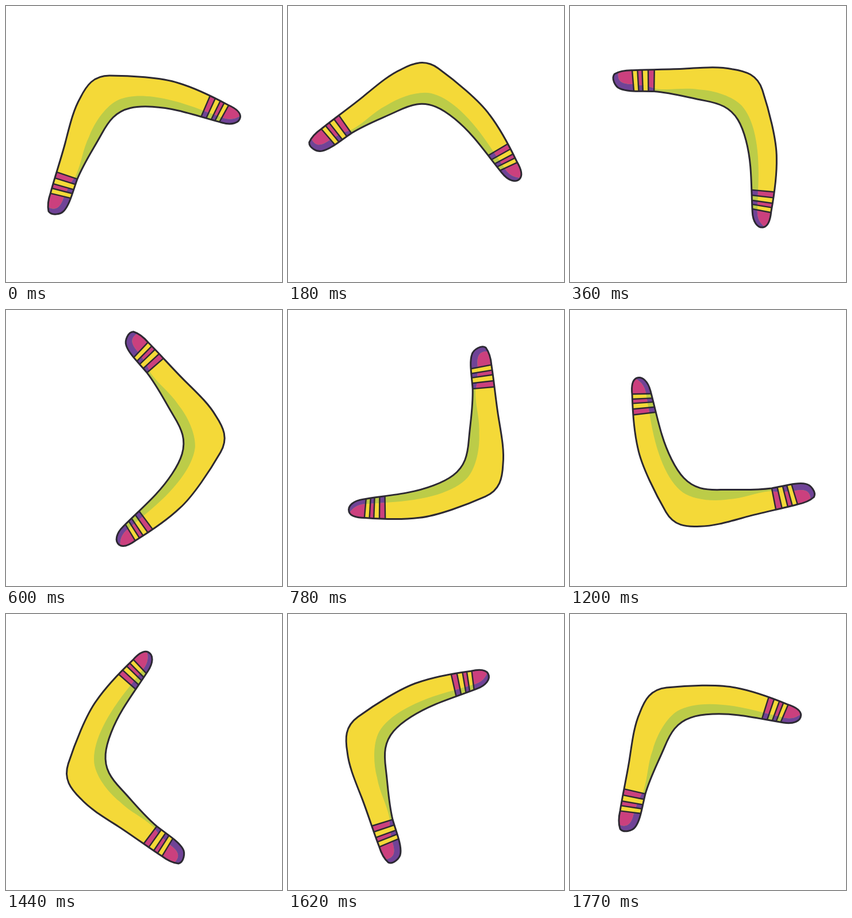
Animation, 480 px wide and 480 px high, one loop 1800 ms. Source, as an HTML page with a canvas:

```html
<!DOCTYPE html>
<html>
<head>
<meta charset="utf-8">
<title>Boomerang</title>
<style>
  html, body { margin: 0; width: 100%; height: 100%; overflow: hidden; background: #fff; }
  canvas { display: block; }
</style>
</head>
<body>
<canvas id="stage" width="480" height="480"></canvas>
<script>
const ctx = document.getElementById('stage').getContext('2d');
const LOOP = 1800, STEP = 30;
const YELLOW = '#f4d938', GREEN = '#bccc48', PINK = '#cb407e', PURPLE = '#704397', INK = '#2c2932';

const body = new Path2D(`M77.5 325 C84 300 95 268 103 238 C111 207 117 181 129 160
  C140 138 152 121 180 121 C215 121 270 124 300 134 C330 143 360 158 386 172
  C402 179 408 186 407.5 193 C406 204 392 207.5 376 203 C350 196 322 187 300 182
  C270 175 237 172.5 216 177.5 C191 183.5 179 199 166 223 C150 252 136 272 124 301
  C116 323 111 345 101 356 C95 363 79 365 74 357 C72 348 74 335 77.5 325Z`);

// Everything on the inner side of the curve
const shade = new Path2D(`M66 345 L76 351 C86 355 94 352 100 334 L111 310 L121 296
  C132 272 133 250 145 226 C155 200 175 173 195 163.5 C225 150.5 275 155.5 343 182
  L376 194 C390 199 400 197 412 188 L430 230 L240 260 L100 400 L60 370Z`);

// First and last band line of each end, as x1, y1, x2, y2
const ends = [
  { from: [89, 289, 124, 301], to: [78, 326, 112, 334], gap: YELLOW },
  { from: [355, 156, 340, 191], to: [387, 173, 371, 202], gap: GREEN }
];
const cuts = [0, .28, .55, .76, 1, 2.6];

// Point on band line k; s runs across the blade
function at({ from, to }, k, s) {
  const [x1, y1, x2, y2] = from.map((v, i) => v + (to[i] - v) * k);
  return [x1 + (x2 - x1) * s, y1 + (y2 - y1) * s];
}

function poly(...points) {
  ctx.beginPath();
  points.forEach(p => ctx.lineTo(...p));
}

function paint(main, band, shaded) {
  ctx.fillStyle = main;
  ctx.fill(body);
  for (const end of ends) {
    for (let i = 0; i < 5; i++) {
      const a = cuts[i], b = cuts[i + 1];
      poly(at(end, a, -.3), at(end, a, 1.3), at(end, b, 1.3), at(end, b, -.3));
      ctx.fillStyle = i % 2 ? (shaded ? end.gap : main) : band;
      ctx.fill();
    }
  }
}

function draw(angle) {
  ctx.clearRect(0, 0, 480, 480);
  ctx.save();
  ctx.translate(240, 240);
  ctx.rotate(angle);
  ctx.translate(-240, -240);

  ctx.save();
  ctx.clip(body);
  paint(YELLOW, PINK, false);
  ctx.save();
  ctx.clip(shade);
  paint(GREEN, PURPLE, true);
  ctx.restore();
  ctx.strokeStyle = INK;
  ctx.lineWidth = 2.4;
  for (const end of ends) {
    for (const k of cuts.slice(0, 5)) {
      poly(at(end, k, -.1), at(end, k, 1.1));
      ctx.stroke();
    }
  }
  ctx.restore();

  ctx.strokeStyle = INK;
  ctx.lineWidth = 3;
  ctx.lineJoin = 'round';
  ctx.stroke(body);
  ctx.restore();
}

function tick() {
  const step = Math.floor(performance.now() % LOOP / STEP);
  draw(step * STEP / LOOP * 2 * Math.PI);
  requestAnimationFrame(tick);
}
tick();
</script>
</body>
</html>
```
